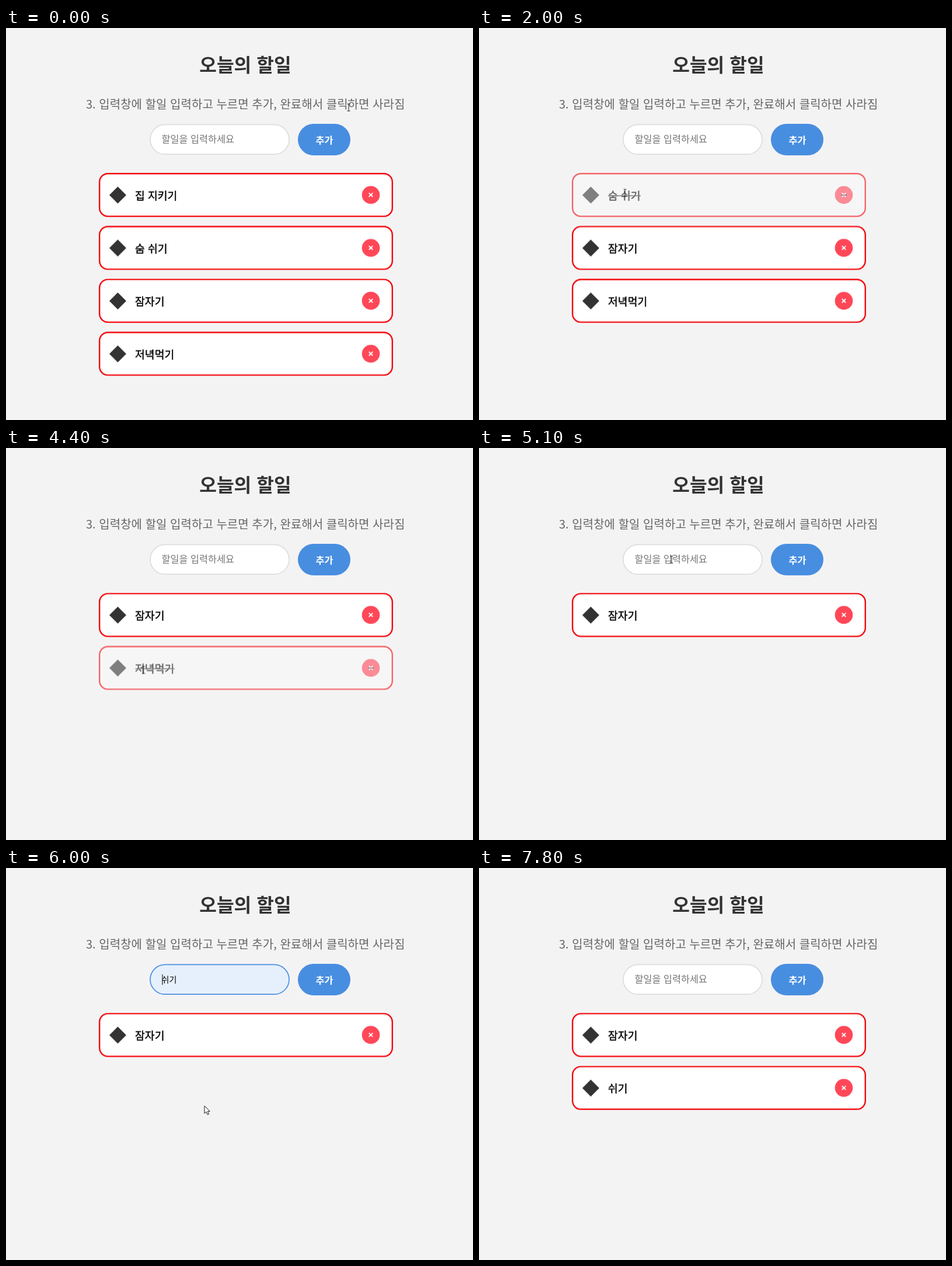
Animation, 800 px wide and 671 px high, one loop 7.9 s. Source, as an HTML page:

```html
<!DOCTYPE html>
<html lang="ko">
<head>
<meta charset="utf-8">
<title>오늘의 할일</title>
<style>
  html, body { margin: 0; width: 100%; height: 100%; overflow: hidden; background: #f4f3f4; }
  svg { display: block; width: 800px; height: 671px; }
  text { font-family: "Noto Sans CJK KR", "Noto Sans KR", "Noto Sans CJK JP", sans-serif; }
  .latin { font: 13.3px "Open Sans", "Noto Sans CJK KR", sans-serif; }
  .card { fill: #fff; stroke: #f4060a; stroke-width: 2.4; }
  .task { font-size: 18.3px; stroke: #000; stroke-width: .4; }
  .strike { stroke: #333; stroke-width: 1.5; opacity: 0; }
  .field { fill: #fff; stroke: #ddd; stroke-width: 1.7; }
  .add { fill: #488ee0; }
  .outline { fill: #fff; stroke: #111; stroke-width: 1; stroke-linejoin: round; }
</style>
</head>
<body>
<svg viewBox="0 0 800 671">
  <text x="410" y="75" font-size="32.3" font-weight="700" fill="#333" text-anchor="middle">오늘의 할일</text>
  <text x="137" y="138" font-size="20.05" fill="#666">3. 입력창에 할일 입력하고 누르면 추가, 완료해서 클릭하면 사라짐</text>

  <rect class="field" x="247" y="165.4" width="238" height="50.8" rx="25.4"/>
  <text id="hint" x="266.5" y="196" font-size="16.3" fill="#757575">할일을 입력하세요</text>
  <g id="values"></g>
  <path id="caret" d="M268 182v18" stroke="#222" stroke-width="1.2"/>
  <rect class="add" x="500" y="164" width="90" height="54" rx="27"/>
  <text x="545.5" y="197.5" font-size="16.3" font-weight="700" fill="#fff" text-anchor="middle">추가</text>

  <g id="rows"></g>

  <g id="popup">
    <rect x="287" y="217.5" width="318" height="215" rx="9" opacity=".05"/>
    <rect x="287.5" y="217" width="317" height="214" rx="8" fill="#fff" stroke="#d4d4dc" stroke-width="1.3"/>
    <path d="M301 217.700L309 209.500L317 217.700" fill="#fff" stroke="#d4d4dc"/>
    <text x="299.5" y="242" font-size="13.2" fill="#555">저장된 정보</text>
    <path d="M580 233l8 8m0-8l-8 8" stroke="#111" stroke-width="1.4"/>
    <rect id="highlight" x="293" y="356" width="310" height="34" rx="4" fill="#f3f2f3"/>
    <g id="options"></g>
  </g>

  <g id="cursor">
    <path id="arrow" class="outline" d="M0 0V13L3 10.300L5.300 15.200L7.500 14.200L5.300 9.400H9.300Z"/>
    <path id="beam" d="M-2.500 -6H2.500M0 -6V6M-2.500 6H2.500" stroke="#222"/>
    <path id="hand" class="outline" d="M-1.500 1Q0 -1 1.500 1V6Q8 5 8 9V13Q8 15 6.500 17V19H-1.500V17.500L-5.500 11.500Q-6 9.500 -4 9.500L-1.500 11.500Z"/>
  </g>
</svg>
<script>
const LOOP = 7900, FADE = 200, ROW_PITCH = 90.6, OPTION_PITCH = 34.1;
const $ = sel => document.querySelector(sel);
const move = (x, y) => `translate(${x}px, ${y}px)`;
const rowCenter = slot => 285.7 + slot * ROW_PITCH;
const optionCenter = i => 270.7 + i * OPTION_PITCH;

// keys: [ms, value] pairs
function track(el, prop, keys, easing = 'step-end') {
  const frames = keys.map(([ms, value]) => ({ offset: ms / LOOP, [prop]: value, easing }));
  frames.push({ offset: 1, [prop]: keys.at(-1)[1] });
  el.animate(frames, { duration: LOOP, iterations: Infinity });
}

// visible during each [from, to) span
function showDuring(el, ...spans) {
  const keys = spans.flatMap(([from, to]) => [[from, 1], [to, 0]]);
  if (spans[0][0] > 0) keys.unshift([0, 0]);
  track(el, 'opacity', keys);
}

// fades to another value at start and back again at end
function blend(el, prop, base, other, start, end = LOOP - FADE) {
  track(el, prop, [[0, base], [start, base], [start + FADE, other], [end, other], [end + FADE, base]], 'linear');
}

function add(parent, markup) {
  $(parent).insertAdjacentHTML('beforeend', markup);
  return $(parent).lastElementChild;
}

const tasks = [
  { name: '집 지키기', gone: 700 },
  { name: '숨 쉬기', done: 1700, gone: 3000 },
  { name: '잠자기' },
  { name: '저녁먹기', done: 3750, gone: 4700 },
  { name: '쉬기', born: 6300 }
];

tasks.forEach(({ name, born = 0, done, gone = LOOP }, i) => {
  const row = add('#rows', `<g><g>
    <rect class="card" x="160.2" y="249.2" width="501.6" height="73.2" rx="14.5"/>
    <path d="M191.500 271.500l14.500 14.500l-14.500 14.500l-14.500-14.500Z" fill="#333"/>
    <text class="task" x="221" y="293.5">${name}</text>
    <circle cx="625" cy="285.7" r="15.3" fill="#ff4757"/>
    <path d="M621.700 282.400l6.600 6.600m0-6.600l-6.600 6.600" stroke="#fff" stroke-width="1.9"/>
    <path class="strike"/>
  </g></g>`);
  const removals = tasks.slice(0, i).filter(task => task.gone).map(task => task.gone);
  track(row, 'transform', [0, ...removals].map((ms, n) => [ms, move(0, (i - n) * ROW_PITCH)]));
  showDuring(row, [born, gone]);
  if (!done) return;
  const strike = row.querySelector('.strike');
  const width = row.querySelector('.task').getComputedTextLength();
  strike.setAttribute('d', `M221.500 287.300h${width}M620 286h10`);
  showDuring(strike, [done, gone]);
  blend(row.firstElementChild, 'opacity', 1, .6, done);
  blend(row.querySelector('.card'), 'fill', '#fff', '#f8f8f8', done);
});

const options = ['ahffkd', 'sdsd', 'sdsds', '안녕', '쉬기'];
options.forEach((label, i) => {
  const style = /[a-z]/.test(label) ? 'class="latin"' : 'font-size="15.3"';
  add('#options', `<text ${style} x="300.5" y="${optionCenter(i) + 5.2}">${label}</text>`);
});
const preview = label => add('#values', `<text x="266.5" y="196" font-size="14.1">${label}</text>`);
showDuring(preview('안녕'), [5500, 5800]);
showDuring(preview('쉬기'), [5800, 6300]);
showDuring($('#highlight'), [5500, 5950]);
track($('#highlight'), 'transform', [[0, move(0, 0)], [5800, move(0, OPTION_PITCH)]]);

showDuring($('#popup'), [5200, 5950]);
showDuring($('#caret'), [5200, 6300]);
showDuring($('#hint'), [0, 5500], [6300, LOOP]);
track($('.field'), 'fill', [[0, '#fff'], [5500, '#e6f0fc'], [6300, '#fff']]);
blend($('.field'), 'stroke', '#ddd', '#4a90e2', 5100, 6300);
blend($('.add'), 'fill', '#488ee0', '#367abf', 6150, 6700);

// the pointer rests for the first half of each gap and travels in the second
const stops = [
  { at: 0, x: 587, y: 136, shape: 'beam' },
  { at: 650, x: 625, y: rowCenter(0), shape: 'hand' },
  { at: 1700, x: 250, y: rowCenter(0) - 3.5, shape: 'beam' },
  { at: 3200, x: 253.5, y: 410.5, shape: 'arrow' },
  { at: 3750, x: 235.5, y: rowCenter(1) + 3.5, shape: 'beam' },
  { at: 5100, x: 330, y: 191, shape: 'beam' },
  { at: 5500, x: 347.5, y: optionCenter(3) + 1.5, shape: 'arrow' },
  { at: 5900, x: 340, y: optionCenter(4), shape: 'arrow' },
  { at: 6200, x: 561, y: 201, shape: 'hand' },
  { at: 7150, x: 615, y: 372 }
];
const keys = [], spans = { arrow: [], beam: [], hand: [] };
stops.forEach(({ at, x, y, shape }, i) => {
  keys.push([at, move(x, y)]);
  if (!shape) return;
  const next = stops[i + 1].at, leave = (at + next) / 2;
  keys.push([leave, move(x, y)]);
  spans[shape].push([at, leave]);
  spans.arrow.push([leave, next]);
});
track($('#cursor'), 'transform', keys, 'ease-in-out');
for (const shape in spans) showDuring($('#' + shape), ...spans[shape]);
</script>
</body>
</html>
```
